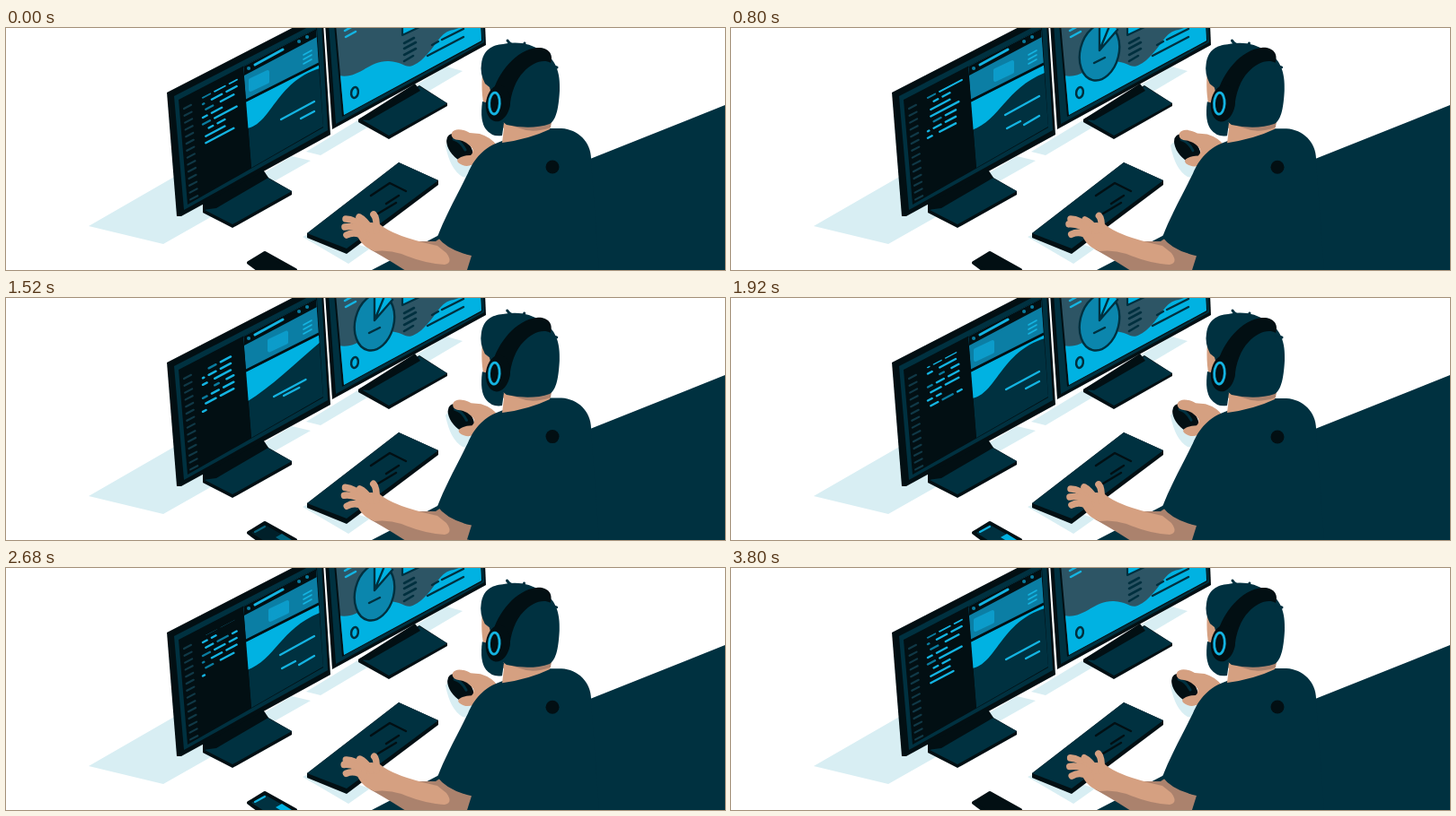
Animation of 800x270 px, one loop 3840 ms. Source, as an HTML page:

```html
<!DOCTYPE html>
<html lang="en">
<head>
<meta charset="utf-8">
<title>Developer at work</title>
<style>
  html, body { margin: 0; width: 100%; height: 100%; overflow: hidden; background: #fff; }
  svg { display: block; width: 100%; height: 100%; }
  .navy { fill: #003140; } .ink { fill: #020f13; } .cyan { fill: #00b2e2; }
  .skin { fill: #d5a081; } .shade { fill: #ab826d; } .shadow { fill: #d8eef3; }
  .line { fill: none; stroke-linecap: round; stroke-linejoin: round; }
  .c { stroke: #14b4e2; } .d { stroke: #0a7c9f; } .n { stroke: #00303f; } .k { stroke: #020f13; }
  .s { stroke: #d5a081; }
</style>
</head>
<body>
<svg viewBox="0 0 800 270" preserveAspectRatio="none">
  <defs>
    <clipPath id="codeClip"><path d="M190 92L264 53V157L200 200Z"/></clipPath>
    <clipPath id="pageClip"><path d="M264 43L345 1L353 110L273 156Z"/></clipPath>
    <clipPath id="chartClip"><path d="M367 -4H528L529 14L376 97Z"/></clipPath>
  </defs>

  <path class="navy" d="M407 270L480 232L650 146L800 86V270Z"/>

  <!-- shadows on the desk -->
  <g class="shadow">
    <path d="M92 221L189 165L240 190L318 143L339 148L175 241Z"/>
    <path d="M334 138L490 43L508 48L350 142Z"/>
    <path d="M330 233L345 226L405 246L381 263Z"/>
    <path d="M489 131Q494 122 512 130L524 152Q520 169 508 166Q494 158 489 131Z"/>
  </g>

  <!-- right monitor -->
  <path class="ink" d="M392 102L460 64L491 84V87L426 124L392 105Z"/>
  <path class="navy" d="M403 96L460 65L491 84L426 120L397 103Z"/>
  <path class="ink" d="M392 102L455 62L461 70L404 103Z"/>
  <path class="ink" d="M355 -5H533L534 19L363 113Z"/>
  <path class="navy" d="M359 -5H531L532 16L367 107Z"/>
  <path class="ink" d="M365 -5H529L530 15L374 99Z"/>
  <g clip-path="url(#chartClip)">
    <path fill="#2d5565" d="M360 -6H540V100H360Z"/>
    <path class="cyan" d="M366 52C392 60 402 36 426 37C446 38 444 50 462 36C480 20 482 4 498 2L540 -12V30L370 106Z"/>
    <path class="line c" stroke-width="2.5" d="M377 3L386 -2M378 10L389 4"/>
    <path class="line n" stroke-width="2.6" d="M443 17L454 11M443 23L456 16M443 30L456 23M443 37L453 31"/>
    <path class="cyan" d="M441 -4V8L459 0V-4Z"/>
    <path class="line n" stroke-width="2.2" d="M441 -4V8L460 -1"/>
    <path class="line n" stroke-width="2.4" d="M469 31L509 10M474 19L481 15M485 13L509 1"/>
    <ellipse class="line n" cx="388" cy="72" rx="3.8" ry="6" stroke-width="2.5" transform="rotate(10 388 72)"/>
    <g id="pie">
      <ellipse cx="410" cy="27" rx="21.5" ry="32" fill="#0b86ad" stroke="#00303f" stroke-width="2.4" transform="rotate(14 410 27)"/>
      <path class="cyan" d="M410 25L410 -5L422 -5L430 2Z"/>
      <path class="line n" stroke-width="2.4" d="M410 -5V25L430 2M410 25L421 -2M404 39L416 33"/>
    </g>
  </g>

  <!-- left monitor -->
  <path class="ink" d="M219 202L285 163L318 182V186L252 223L219 206Z"/>
  <path class="navy" d="M233 197L287 165L318 182L252 219L221 203Z"/>
  <path class="ink" d="M219 203V190L284 155L292 167L234 201Z"/>
  <path class="ink" d="M179 72L330 -6H353L361 119L195 210L190 210Z"/>
  <path class="navy" d="M187 76L342 -4H351L358 114L198 203Z"/>
  <path class="ink" d="M192 80L346 0L353 111L202 197Z"/>
  <path id="numbers" class="line" stroke="#103947" stroke-width="2.2"/>
  <g clip-path="url(#codeClip)">
    <path id="dim" class="line d" stroke-width="2.4"/>
    <path id="bright" class="line c" stroke-width="2.4"/>
  </g>
  <g clip-path="url(#pageClip)">
    <path class="navy" d="M264 42L346 -1L354 112L273 157Z"/>
    <path fill="#0b7ea4" d="M264 42L346 -1L348 39L267 80Z"/>
    <path class="ink" d="M264 42L346 -1V10L265 53Z"/>
    <path class="line c" stroke-width="3" d="M277 41L308 24"/>
    <path class="line d" stroke-width="4" d="M270 45h.1M326 15h.1M335 10h.1"/>
    <path id="card" fill="#0c9cca" stroke="#0c9cca" stroke-width="4" stroke-linejoin="round" d="M272 58L291 49L291 60L272 69Z"/>
    <path class="line c" stroke-width="1.6" d="M331 30L340 25M331 35L340 30M331 40L340 35"/>
    <path id="wave" class="cyan"/>
    <path class="line k" stroke-width="3" d="M265 82L350 39"/>
    <g id="captions"></g>
  </g>

  <!-- phone -->
  <path class="ink" stroke="#020f13" stroke-width="4" stroke-linejoin="round" d="M270 262L288 251L322 270L300 284Z"/>
  <g id="phone">
    <path class="navy" d="M273 262L288 253L316 269L300 279Z"/>
    <path class="cyan" d="M300 267L307 263L318 270H305Z"/>
    <path class="line c" stroke-width="2" d="M277 261L288 255"/>
  </g>

  <!-- keyboard -->
  <path class="ink" d="M335 229L437 150L481 170V175L379 252L335 234Z"/>
  <path class="navy" d="M335 229L437 150L481 170L379 246Z"/>
  <path class="line k" stroke-width="2.5" d="M406 187L427 173L445 182M423 196L437 187M414 207L434 195"/>

  <!-- mouse hand -->
  <g id="mouse">
    <ellipse class="ink" cx="505" cy="134" rx="19" ry="11" transform="rotate(50 505 134)"/>
    <path class="line n" stroke-width="3" d="M498 124Q506 126 511 136"/>
    <path class="skin" d="M496 117C499 111 509 113 516 117L527 118Q540 122 546 131L524 149Q516 156 508 153Q500 150 503 146Q508 142 517 142Q522 137 517 132Q511 126 504 125Q494 124 496 117Z"/>
  </g>

  <!-- typing arm -->
  <path class="shade" d="M400 238L478 238L490 230L522 253L514 271H445Q425 258 405 247Z"/>
  <path class="skin" d="M389 226Q400 213 416 219Q430 232 480 243L490 251Q498 262 488 264Q466 263 440 252Q425 247 410 249Q393 243 389 226Z"/>
  <g id="fingers" class="line s" stroke-width="7.6"></g>

  <!-- body -->
  <g id="body">
    <path class="navy" d="M552 126C531 133 521 146 514 162C500 190 488 212 480 233Q491 248 518 254L513 270H660L651 148C652 128 637 113 618 112L602 112Z"/>
    <circle class="ink" cx="608" cy="155" r="7.5"/>
  </g>

  <!-- head -->
  <g id="head">
    <path class="skin" d="M530 50L546 55L556 100L607 104L605 113Q582 124 552 128L554 112L534 94Q528 78 530 50Z"/>
    <path class="shade" d="M556 107L607 104L606 111Q586 118 572 112Z"/>
    <path class="navy" d="M533 62Q527 50 529 40C531 24 541 19 553 18Q578 13 596 26C612 34 617 50 616 70C615 87 613 102 605 107Q584 114 557 108L547 100L538 66Z"/>
    <path class="line n" stroke-width="3" d="M558 14Q561 19 568 20M577 17L575 23M606 42L613 44"/>
    <path class="navy" d="M530 82L545 86L554 106L552 120Q541 122 534 113Q527 104 530 82Z"/>
    <path class="ink" d="M541 74C547 50 568 24 591 22C602 21 610 28 606 39C598 34 585 39 576 49C567 58 562 72 560 90Z"/>
    <ellipse class="ink" cx="547.5" cy="84" rx="13.5" ry="20.5" transform="rotate(8 548 84)"/>
    <ellipse class="line c" cx="543.5" cy="84" rx="5.8" ry="12" stroke-width="2.8" transform="rotate(3 543 84)"/>
  </g>
</svg>

<script>
const LOOP = 3840, ROW = 7.5, CHAR = 3.3, SLOPE = 0.53;
const el = id => document.getElementById(id);
const clamp = x => Math.max(0, Math.min(1, x));
const ease = x => { x = clamp(x); return x * x * (3 - 2 * x); };
const mix = (a, b, p) => a + (b - a) * p;
const span = (t, a, b) => ease((t - a) / (b - a));
const swing = (t, n, phase = 0) => Math.sin(2 * Math.PI * (n * t / LOOP + phase));

// Value at t in a table of [time, value] steps.
function track(steps, t) {
  let i = 1;
  while (i < steps.length - 1 && t > steps[i][0]) i++;
  const [t0, a] = steps[i - 1], [t1, b] = steps[i];
  return mix(a, b, span(t, t0, t1));
}

function add(parent, cls, width) {
  const p = document.createElementNS('http://www.w3.org/2000/svg', 'path');
  p.setAttribute('class', cls);
  if (width) p.setAttribute('stroke-width', width);
  return parent.appendChild(p);
}

// '=' is bright code, '-' is dim code.
const rows = [
  '  --- ====', '= === ====', '==  ======', '    --  ===',
  '-- === ====', ' ==== =====', '== ==', ' === ---- ==',
  '--- ==== ===', '-  ==== ====', ' ---  =====', '== ====',
  '--- ========', '  == ===', ' =======', ' =========='
];
const bottom = [[0, 130], [1120, 128], [1920, 122], [2680, 115], [3200, 108], [3760, 130], [LOOP, 130]];
const mouseX = [[0, 0], [440, 4], [1120, 2], [1920, 1], [2680, 1], [3200, -1], [LOOP, 0]];

el('numbers').setAttribute('d', Array.from({ length: 14 }, (_, i) =>
  `M${198 + i * .55} ${90 + i * 7.8}l8 -4.2`).join(''));

function drawCode(t) {
  const n = t / 240, now = Math.floor(n), part = n - now;
  const scroll = now + ease(part * 2), base = track(bottom, t);
  const paths = { '=': '', '-': '' };
  for (let k = now; k > now - 9; k--) {
    const text = rows[(k + 32) % 16];
    const shown = k === now ? text.length * part : text.length;
    const y = base + (k + 1 - scroll) * ROW;
    for (const run of text.matchAll(/=+|-+/g)) {
      const len = Math.min(run[0].length, shown - run.index) - .6;
      if (len <= 0) continue;
      const dx = run.index * CHAR, w = len * CHAR;
      paths[run[0][0]] += `M${219 + dx} ${y - dx * SLOPE}l${w} ${-w * SLOPE}`;
    }
  }
  el('bright').setAttribute('d', paths['=']);
  el('dim').setAttribute('d', paths['-']);
}

// Three slides: wave handles and caption lines as [x1, y1, x2, y2].
const slides = [
  { wave: [112, 295, 108, 300, 60, 45], lines: [[306, 102, 343, 82], [328, 101, 343, 93]] },
  { wave: [114, 300, 102, 305, 68, 50], lines: [[305, 97, 343, 76], [307, 112, 322, 104], [326, 108, 343, 98]] },
  { wave: [116, 295, 99, 322, 74, 50], lines: [[298, 110, 337, 89], [309, 109, 328, 99]] }
];
const captions = slides.map(s => s.lines.map(() => add(el('captions'), 'line c', 2.3)));

function drawPage(t) {
  const u = t % 1920;
  const ab = span(u, 160, 440), bc = span(u, 840, 1080), ca = span(u, 1480, 1800);
  const weights = [1 - ab + ca, ab - bc, bc - ca];
  const [y0, x1, y1, x2, y2, y3] = slides[0].wave.map((_, i) =>
    slides.reduce((sum, s, j) => sum + s.wave[i] * weights[j], 0));
  el('wave').setAttribute('d', `M266 83L349 40V${y3}C${x2} ${y2} ${x1} ${y1} 268 ${y0}Z`);
  el('card').setAttribute('transform', `translate(${22 * (1 - weights[0])} ${-11 * (1 - weights[0])})`);
  slides.forEach((s, j) => s.lines.forEach(([ax, ay, bx, by], i) => {
    const p = clamp(weights[j] * 2 - 1), line = captions[j][i];
    line.setAttribute('visibility', p > 0 ? 'visible' : 'hidden');
    line.setAttribute('d', `M${ax} ${ay}L${mix(ax, bx, p)} ${mix(ay, by, p)}`);
  }));
}

// Fingertip, knuckle, root.
const fingers = [
  [378, 213, 388, 213, 399, 224],
  [377, 222, 388, 220, 398, 227],
  [379, 231, 388, 226, 400, 233],
  [393, 211, 399, 214, 407, 226],
  [409, 208, 413, 212, 412, 226]
];
const fingerPaths = fingers.map(() => add(el('fingers'), 'line'));

function drawHand(t) {
  fingers.forEach(([ax, ay, bx, by, cx, cy], i) => {
    const lift = 1.6 * (swing(t, 12, i * .23) - swing(0, 12, i * .23));
    fingerPaths[i].setAttribute('d', `M${ax + lift * .3} ${ay + lift}Q${bx} ${by + lift * .6} ${cx} ${cy}`);
  });
}

function draw(t) {
  drawCode(t);
  drawPage(t);
  drawHand(t);
  const size = span(t, 60, 420) - span(t, 3120, 3600);
  el('pie').setAttribute('transform', `translate(410 27) scale(${size}) translate(-410 -27)`);
  el('pie').setAttribute('visibility', size > 0.01 ? 'visible' : 'hidden');
  el('phone').setAttribute('opacity', span(t, 1440, 1600) - span(t, 3440, 3600));
  el('mouse').setAttribute('transform', `translate(${track(mouseX, t)} ${track(mouseX, t) * .2})`);
  el('head').setAttribute('transform', `rotate(${-.3 * Math.abs(swing(t, 1))} 580 115)`);
  el('body').setAttribute('transform', `translate(0 ${.4 * swing(t, 2)})`);
}

const start = performance.now();
function frame() {
  draw((performance.now() - start) % LOOP);
  requestAnimationFrame(frame);
}
frame();
</script>
</body>
</html>
```
